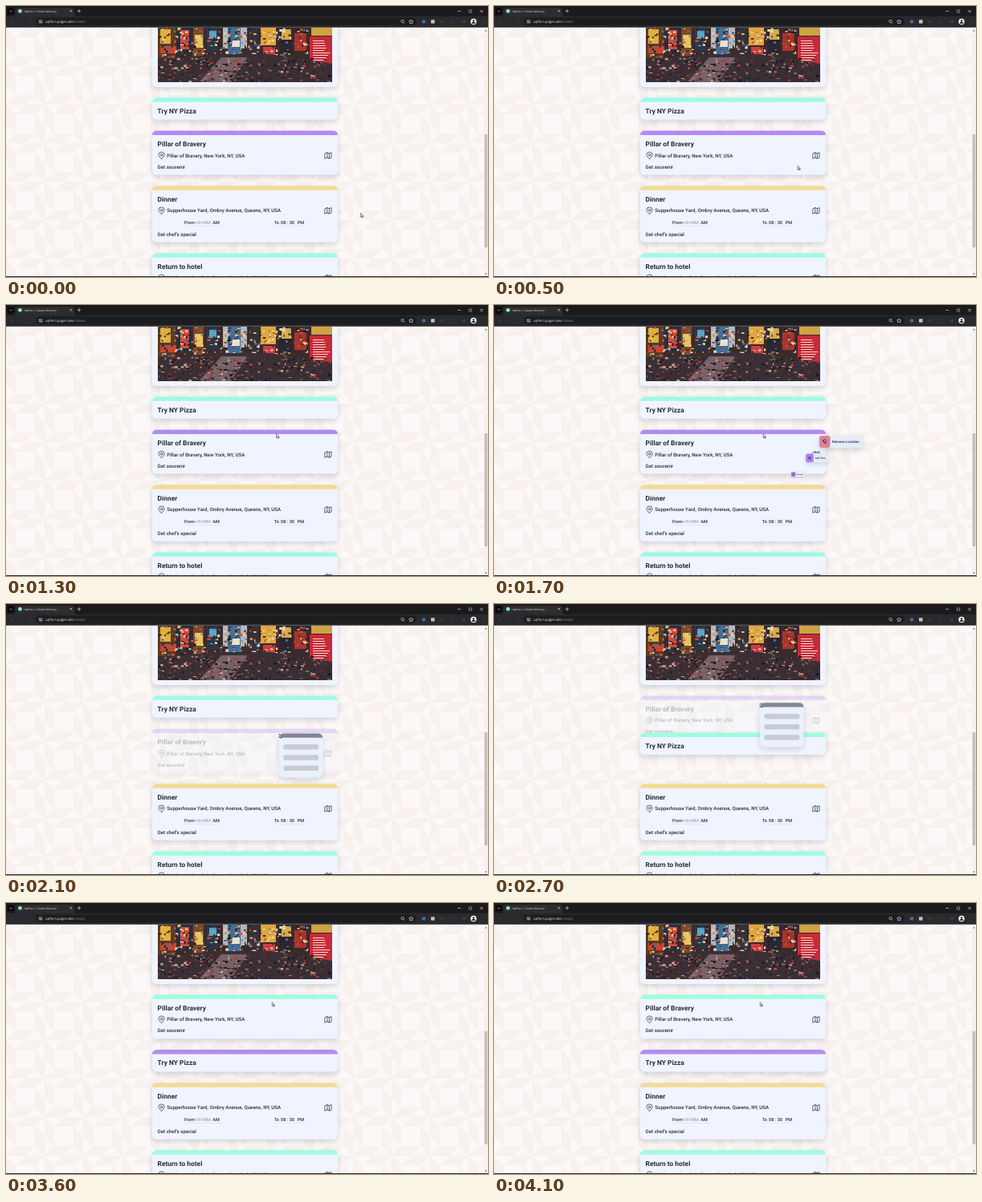
Animation of 600x338 px, one loop 5600 ms. Source, as an HTML page:

```html
<!DOCTYPE html>
<html lang="en">
<head>
<meta charset="utf-8">
<title>Create Itinerary</title>
<style>
  html, body { margin: 0; width: 100%; height: 100%; overflow: hidden; background: #fcf8f7; }
  svg { display: block; width: 100vw; height: 100vh; }
  text { font-family: Roboto, sans-serif; font-weight: 500; fill: #2b2d33; text-rendering: geometricPrecision; }
  .title { font-size: 8.4px; font-weight: 700; }
  .row { font-size: 6.15px; }
  .time { font-size: 5.5px; }
  .ui { font-family: "Open Sans", sans-serif; font-weight: 400; fill: #e6e6e8; }
  .card { filter: drop-shadow(0 3.5px 3.5px rgba(50, 60, 90, .19)); }
  .line { fill: none; stroke: #33363d; stroke-width: .75; stroke-linejoin: round; stroke-linecap: round; }
</style>
</head>
<body>
<svg id="stage" viewBox="0 0 600 338" preserveAspectRatio="none"></svg>
<script>
const LOOP = 5600, STEP = 100;
const MINT = '#a0fbe0', PURPLE = '#b18cf0', YELLOW = '#f2dc94';
const stage = document.getElementById('stage');

const rect = (x, y, w, h, fill, rx = 0, more = '') =>
  `<rect x="${x}" y="${y}" width="${w}" height="${h}" fill="${fill}" rx="${rx}" ${more}/>`;
const text = (x, y, s, cls, more = '') => `<text x="${x}" y="${y}" class="${cls}" ${more}>${s}</text>`;
const path = (d, more = 'class="line"') => `<path d="${d}" ${more}/>`;
const circle = (x, y, r, more) => `<circle cx="${x}" cy="${y}" r="${r}" ${more}/>`;

function seeded(seed) {
  return () => (seed = (seed * 16807) % 2147483647) / 2147483647;
}

// Page backdrop: a pinwheel of parallelograms
function backdrop() {
  const arms = [0, 90, 180, 270].map(a =>
    `<g transform="rotate(${a} 24 24)">` + path('M0 0L12 12V36L0 24Z', 'fill="#f7f1ef"') + '</g>').join('');
  return '<defs><pattern id="tile" width="48" height="48" y="27" patternUnits="userSpaceOnUse">' +
    arms + '</pattern></defs>' +
    rect(0, 26.5, 595, 311, '#fcf8f7') + rect(0, 26.5, 595, 311, 'url(#tile)');
}

// City street at night, in flat shapes
function photo() {
  const rnd = seeded(77);
  const pick = a => a[Math.floor(rnd() * a.length)];
  const specks = (n, x, y, w, h, sw, sh, colors) => Array.from({ length: n }, () =>
    rect((x + rnd() * w).toFixed(1), (y + rnd() * h).toFixed(1),
      (.8 + rnd() * sw).toFixed(1), (.8 + rnd() * sh).toFixed(1), pick(colors))).join('');
  const boards = [
    [189, 27, 22, 38, '#5b3b27'], [192, 29, 13, 18, '#e2b03a'], [192, 50, 20, 9, '#c8452e'],
    [213, 27, 18, 32, '#1f3146'], [217, 30, 11, 24, '#d84b36'], [233, 27, 13, 36, '#7b4a2c'],
    [235, 36, 10, 16, '#ecc35a'], [250, 27, 14, 30, '#29374b'], [253, 31, 9, 10, '#5fa4c4'],
    [270, 27, 30, 26, '#b5b7bd'], [276, 27, 16, 33, '#3c6f9a'], [279, 43, 12, 8, '#e9e2d0'],
    [303, 27, 12, 36, '#34313a'], [317, 27, 19, 22, '#e0a63d'], [320, 51, 15, 10, '#cf3d41'],
    [340, 27, 17, 34, '#2b2730'], [343, 29, 12, 13, '#d9a94c'], [359, 34, 15, 22, '#a8352f'],
    [378, 38, 28, 34, '#c72b38'], [380, 27, 26, 10, '#cfa343']
  ].map(b => rect(...b)).join('');
  const lines = Array.from({ length: 9 }, (_, i) => rect(382, 43 + i * 3, 14 + rnd() * 8, 1, '#f3d9d2')).join('');
  return '<clipPath id="shot"><rect x="189" y="20" width="217" height="75"/></clipPath><g clip-path="url(#shot)">' +
    rect(189, 27, 217, 68, '#3b2a2a') + boards +
    specks(280, 189, 27, 186, 36, 3, 2.5, ['#f0cf78', '#1c1a22', '#d9523f', '#e8ddc8', '#3a2925', '#4d6f92']) + lines +
    path('M189 66L270 60H330L406 72V95H189Z', 'fill="#3a2f34"') +
    path('M268 64H300L280 95H240Z', 'fill="#786267"') +
    specks(330, 189, 64, 216, 30, 3.5, 2, ['#1d191e', '#a8434a', '#8f7370', '#5a3238', '#2f2a31', '#c9a894', '#221d22']) + '</g>';
}

const pin = y => path(`M193.6 ${y + 4.2}C191.5 ${y + 2} 190 ${y + .7} 190 ${y - .8}A3.6 3.6 0 0 1 197.2 ${y - .8}C197.2 ${y + .7} 195.7 ${y + 2} 193.6 ${y + 4.2}Z`) +
  circle(193.6, y - .7, 1.3, 'class="line"');
const map = y => path(`M397.2 ${y - 2.6}L399.8 ${y - 3.7}L402.4 ${y - 2.6}L405 ${y - 3.7}V${y + 2.6}L402.4 ${y + 3.7}L399.8 ${y + 2.6}L397.2 ${y + 3.7}ZM399.8 ${y - 3.7}V${y + 2.6}M402.4 ${y - 2.6}V${y + 3.7}`);

// Cards are drawn with their top edge at y = 0
function card(id, y, h, color, title, place, note, extra = '') {
  return `<g id="${id}" class="card" transform="translate(0 ${y})">` +
    rect(182, 0, 231, h, '#eff4ff', 5.5) +
    path('M182 5.5A5.5 5.5 0 0 1 187.5 0H407.5A5.5 5.5 0 0 1 413 5.5Z', `class="bar" fill="${color}"`) +
    text(188.6, 19.3, title, 'title') +
    (place ? pin(31) + map(31) + text(200.3, 33.2, place, 'row') : '') +
    (note ? text(188.6, h - 8, note, 'row') : '') + extra + '</g>';
}

const times = text(222, 47.3, 'From', 'time') + text(236, 47.3, 'HH:MM', 'time', 'style="fill:#a3a8b5"') +
  text(257.3, 47.3, 'AM', 'time') + text(334, 47.3, 'To', 'time') + text(342, 47.3, '08', 'time') +
  text(349.6, 47.3, ':', 'time') + text(352.7, 47.3, '30', 'time') + text(362.7, 47.3, 'PM', 'time') +
  rect(222, 49.8, 46, .5, '#d3d8e4') + rect(334, 49.8, 38, .5, '#d3d8e4');

function browser() {
  const dim = 'fill="none" stroke="#37345a" stroke-width=".8"';
  const lit = 'fill="none" stroke="#d4d4d8" stroke-width=".7"';
  return rect(0, 0, 600, 26.5, '#1b1b1d') +
    path('M9 13Q11.5 13 11.5 10V5Q11.5 2 14.5 2H82Q85 2 85 5V10Q85 13 87.5 13Z', 'fill="#2d2d30"') +
    rect(0, 12.8, 600, 13.7, '#2a2a2d') + rect(37, 14.5, 474, 10, '#1d1d20', 5) +
    rect(2, 2.5, 8, 8, '#0b0b0c', 2.5) + path('M4.5 5.8L6 7.3L7.5 5.8', lit) +
    circle(17.5, 6.3, 2.4, 'fill="#8ee8cf"') +
    text(22.5, 7.7, 'UpFern - Create Itinerary', 'ui', 'font-size="3.5"') +
    path('M79.5 5L82 7.5M82 5L79.5 7.5M88.8 6.3H93.2M91 4.1V8.5', lit) +
    path('M562.3 6.5H566M590.3 4.8L593.7 8.2M593.7 4.8L590.3 8.2', lit) +
    rect(576.5, 4.9, 3.2, 3.2, 'none', .5, 'stroke="#d4d4d8" stroke-width=".6"') +
    path('M10 19.5H5.5L7.5 17.5M5.5 19.5L7.5 21.5M16.5 19.5H21L19 17.5M21 19.5L19 21.5M32 18A2.5 2.5 0 1 0 32.5 20', dim) +
    circle(43, 19.5, 3.4, 'fill="#303034"') +
    path('M41 18.6H45M41 20.6H45', lit) + circle(42, 18.6, .7, 'fill="#ddd"') + circle(44, 20.6, .7, 'fill="#ddd"') +
    text(49, 21.1, 'upfern.pages.dev<tspan fill="#8d8d92">/create</tspan>', 'ui', 'font-size="4.35"') +
    circle(493.6, 19.1, 1.7, lit) + path('M494.9 20.4L496.3 21.8', lit) +
    path('M504.3 16.9L505.1 18.6L507 18.8L505.6 20.1L506 22L504.3 21L502.6 22L503 20.1L501.6 18.8L503.5 18.6Z', lit) +
    circle(520, 19.5, 2.3, 'fill="#3f6f9f"') + rect(529, 17.2, 4.6, 4.6, '#bfc1c6', .8) +
    circle(542.5, 19.5, 2.2, 'fill="#37373c"') + rect(552, 17.4, 4.2, 4.2, 'none', 1, 'stroke="#37345a" stroke-width=".8"') +
    circle(570, 19.5, 2.1, 'fill="#3c3370"') +
    circle(582, 19.5, 3.7, 'fill="#f4f4f4"') + circle(582, 18.4, 1.2, 'fill="#222"') +
    path('M579.8 21.9A2.2 2.2 0 0 1 584.2 21.9Z', 'fill="#222"') +
    [17.6, 19.5, 21.4].map(y => circle(594, y, .5, 'fill="#4a4770"')).join('') +
    rect(0, 337, 600, 1, '#2a2a2d');
}

const scrollbar = rect(595, 26.5, 5, 311, '#f3f2f2') + rect(595.7, 160, 3.6, 141, '#bfbfbf') +
  path('M596.3 31.5L597.5 29.8L598.7 31.5ZM596.3 333.5L597.5 335.2L598.7 333.5Z', 'fill="#555"');

const menu = [
  { label: 'Remove Location', w: 53, color: '#dd8398', icon: 'M-1.8 -1.2A1.8 1.8 0 0 1 1.8 -1.2Q1.8 .4 0 2.6Q-1.8 .4 -1.8 -1.2ZM-2.5 -2.5L2.5 2.5' },
  { label: 'Add Time', w: 40, color: '#a983ee', icon: 'M-2.3 0A2.3 2.3 0 0 1 2.3 0A2.3 2.3 0 0 1 -2.3 0ZM0 -1.4V0L1.1 .6' },
  { label: 'Add Image', w: 42, color: '#a983ee', icon: 'M-2 -2.3H2V2.3H-2ZM-1 -.8H1M-1 .8H1' }
];
const menuItem = m => `<g class="item"><g class="card">${rect(-m.w / 2, -7.5, m.w, 15, '#e6ecf9', 3)}</g>` +
  rect(-m.w / 2, -7.5, 13.5, 15, m.color, 3) +
  `<g transform="translate(${-m.w / 2 + 6.7} 0)">${path(m.icon)}</g>` +
  text(-m.w / 2 + 16, 1.6, m.label, '', 'font-size="4.35"') + '</g>';

const preview = '<g id="preview" class="card" opacity=".93">' + rect(0, 0, 54.5, 55, '#eaf1fd', 6) +
  path('M0 5.2Q.5 0 6 0H48.5Q54 0 54.5 5.2Z', 'fill="#787e8b"') +
  [13.6, 26.8, 40].map(y => rect(5.5, y, 44, 6.5, '#c5c9d2', 3.2)).join('') + '</g>';

const landmark = 'Pillar of Bravery';
stage.innerHTML = backdrop() +
  `<g class="card">${rect(182, 0, 231, 101, '#eff4ff', 5.5)}</g>` + photo() +
  card('statue', 155.5, 55, PURPLE, landmark, landmark + ', New York, NY, USA', 'Get souvenir') +
  card('pizza', 114.3, 27.5, MINT, 'Try NY Pizza') +
  card('dinner', 224.3, 70.5, YELLOW, 'Dinner', 'Supperhouse Yard, Ombry Avenue, Queens, NY, USA', 'Get chef\'s special', times) +
  card('hotel', 308.3, 70, MINT, 'Return to hotel', 'Marlow Lodge, Orrin Street, New York, NY, USA') +
  menu.map(menuItem).join('') + preview + scrollbar + browser() +
  '<g id="cursor">' + path('M0 0V4.8L1.2 3.7L2 5.5L2.8 5.1L2 3.4H3.5Z', 'fill="#fff" stroke="#26262a" stroke-width=".6" stroke-linejoin="round"') + '</g>';

const el = id => document.getElementById(id);
const statue = el('statue'), pizza = el('pizza'), drag = el('preview'), cursor = el('cursor');
const items = [...stage.querySelectorAll('.item')];

const clamp = v => Math.max(0, Math.min(1, v));
const smooth = p => p * p * (3 - 2 * p);
const easeOut = p => 1 - (1 - p) ** 3;
const move = (node, x, y, s = 1) => node.setAttribute('transform', `translate(${x} ${y}) scale(${s})`);
const show = (node, on) => node.setAttribute('visibility', on ? 'visible' : 'hidden');
const tint = (node, color) => node.querySelector('.bar').setAttribute('fill', color);

const LIFT = 2000, SWAP = 2500, DROP = 3600;
// time, x, y
const route = [[0, 441.7, 258.5], [100, 441.7, 258.5], [800, 336.7, 161], [1300, 336.7, 161],
  [1600, 335.2, 161], [1900, 335.2, 161], [2100, 340, 162], [2600, 331.3, 123.8], [LOOP, 331.3, 123.8]];

function pointer(t) {
  const i = route.findIndex(k => k[0] > t);
  const [a, b] = [route[i - 1], route[i]];
  const p = smooth((t - a[0]) / (b[0] - a[0]));
  return [a[1] + (b[1] - a[1]) * p, a[2] + (b[2] - a[2]) * p];
}

function draw(t) {
  const [x, y] = pointer(t);
  const held = t >= LIFT && t < DROP, dropped = t >= DROP;
  move(cursor, x, y);
  move(drag, x - .3, y - .5);
  show(drag, held);

  move(statue, 0, t < SWAP ? 155.5 : 114.3);
  statue.setAttribute('opacity', held ? .28 : 1);
  move(pizza, 0, 114.3 + 68.7 * easeOut(clamp((t - SWAP) / 645)));
  tint(statue, dropped ? MINT : PURPLE);
  tint(pizza, dropped ? PURPLE : MINT);

  items.forEach((item, i) => {
    const s = clamp((t - 1370 - i * 100) / 320);
    show(item, s > 0 && t < LIFT);
    move(item, 405 + menu[i].w / 2 - 80 * (1 - s), 170.5 + i * 20.4, s);
  });
}

function frame() {
  const t = performance.now() % LOOP;
  draw(Math.floor(t / STEP) * STEP);
  requestAnimationFrame(frame);
}
frame();
</script>
</body>
</html>
```
